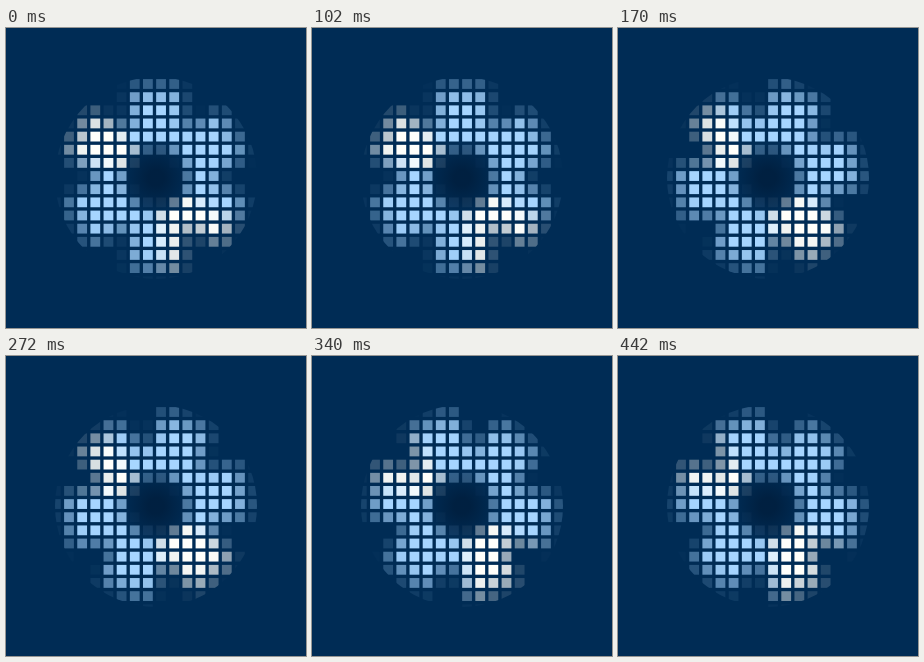
An HTML page with a canvas that plays this animation: 300x300 px, repeating every 0.51 s.

```html
<!DOCTYPE html>
<html lang="en">
<head>
<meta charset="utf-8">
<title>Mosaic gear</title>
<style>
html, body { margin: 0; width: 100%; height: 100%; overflow: hidden; background: #002c55; }
canvas { display: block; }
</style>
</head>
<body>
<canvas width="300" height="300"></canvas>
<script>
const ctx = document.querySelector('canvas').getContext('2d');
const PITCH = 13.15, CELL = 9.8, CENTER = 150;
const STEP = 170, STEPS = 3, TOOTH = Math.PI / 3;
const BLUE = [166, 213, 255], WHITE = [255, 255, 251];

// Soft threshold: 0 below -soft, 1 above +soft
function soften(distance, soft) {
  const t = Math.min(1, Math.max(0, (distance / soft + 1) / 2));
  return t * t * (3 - 2 * t);
}

function gear(x, y, turn) {
  const r = Math.hypot(x, y);
  let a = (Math.atan2(y, x) - turn - Math.PI / 6) % TOOTH;
  if (a > TOOTH / 2) a -= TOOTH;
  if (a < -TOOTH / 2) a += TOOTH;
  const along = r * Math.cos(a), across = Math.abs(r * Math.sin(a));
  const body = soften(63 - r, 13);
  const tooth = soften(26 - across, 12) * soften(90 - along, 17);
  return Math.max(body, tooth) * soften(r - 32, 10);
}

// Fixed beam of light around a direction in degrees
function beam(angle, middle, half) {
  const off = Math.abs((angle - middle + 540) % 360 - 180);
  return soften(half - off, 9);
}

function shine(x, y) {
  const angle = Math.atan2(y, x) * 180 / Math.PI;
  return Math.max(beam(angle, 214, 21), beam(angle, 57, 29));
}

function draw(turn) {
  ctx.fillStyle = '#002c55';
  ctx.fillRect(0, 0, 300, 300);
  const shade = ctx.createRadialGradient(CENTER, CENTER, 8, CENTER, CENTER, 34);
  shade.addColorStop(0, 'rgba(0,28,58,.75)');
  shade.addColorStop(1, 'rgba(0,28,58,0)');
  ctx.fillStyle = shade;
  ctx.fillRect(110, 110, 80, 80);

  ctx.save();
  ctx.beginPath();
  ctx.arc(CENTER, CENTER, 101, 0, 7);
  ctx.clip();
  for (let row = 0; row < 16; row++) {
    for (let col = 0; col < 16; col++) {
      const cx = 49.85 + col * PITCH, cy = 56 + row * PITCH;
      const x = cx - CENTER, y = cy - CENTER;
      const alpha = gear(x, y, turn);
      if (alpha < .01) continue;
      const light = shine(x, y);
      const rgb = BLUE.map((c, i) => Math.round(c + (WHITE[i] - c) * light));
      ctx.fillStyle = `rgba(${rgb},${alpha})`;
      ctx.fillRect(cx - CELL / 2, cy - CELL / 2, CELL, CELL);
    }
  }
  ctx.restore();
}

function tick() {
  const step = Math.floor(performance.now() / STEP) % STEPS;
  draw(step * TOOTH / STEPS);
  requestAnimationFrame(tick);
}
tick();
</script>
</body>
</html>
```
